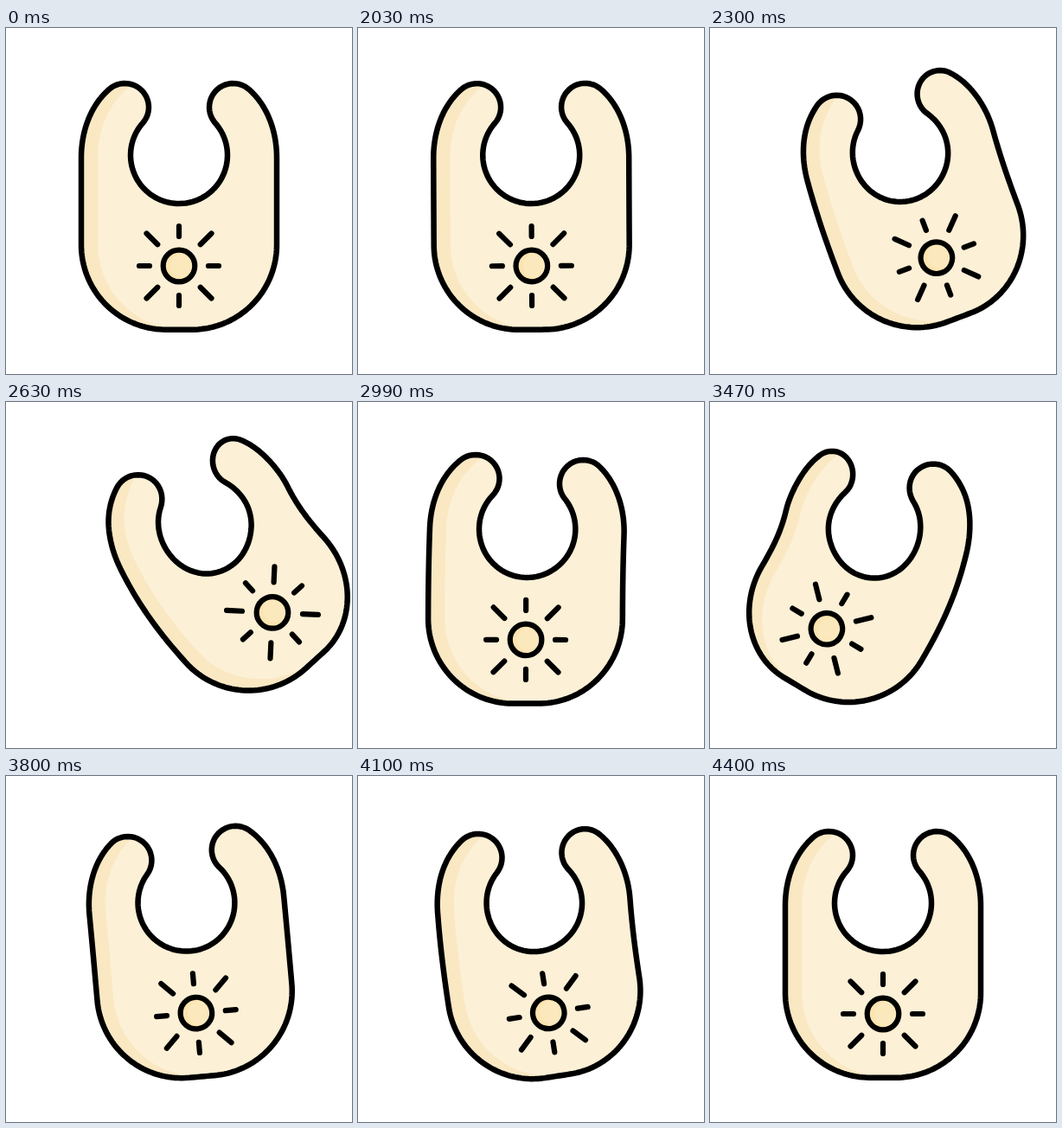
Write an HTML page that moves like this. It is 400 px wide and 400 px high and loops after 4430 ms.

```html
<!DOCTYPE html>
<html>
<head>
<meta charset="utf-8">
<style>
html, body { margin: 0; width: 100%; height: 100%; overflow: hidden; background: #fff; }
svg { display: block; width: 100vw; height: 100vh; }
</style>
</head>
<body>
<svg viewBox="0 0 400 400">
  <path id="fill" fill="#fcf0d6"/>
  <path id="shade" fill="#fae8c3"/>
  <path id="line" fill="none" stroke="#000" stroke-width="6.5" stroke-linejoin="round"/>
  <g id="sun" stroke="#000" stroke-width="6.2" stroke-linecap="round">
    <circle r="18.3" fill="#fce4b0" stroke="none"/>
    <circle cx="4" r="14" fill="#fbe8bc" stroke="none"/>
    <circle r="18.3" fill="none"/>
    <path id="rays" fill="none"/>
  </g>
</svg>
<script>
const LOOP = 4430, START = 2030, STEP = 30;
const MID = 200, TOP = 60, END = 352, SUN_Y = 275;
const BODY = 'M158 110A27.6 27.6 0 0 0 118 72C98 90 87 119 87 150V250A98 98 0 0 0 185 348.7' +
  'H215A98 98 0 0 0 313 250V150C313 119 302 90 282 72A27.6 27.6 0 0 0 242 110A56 56 0 1 1 158 110Z';
const SHADE = 'M146 65Q130 60 118 72C98 90 87 119 87 150V250A98 98 0 0 0 185 348' +
  'H200C148 346 106 303 106 250V150C106 115 120 85 146 65Z';

// turning points of the swing: time, angle of the bottom, angle of the straps
const SWING = [
  [2000, 0, 0],
  [2610, -42.5, -23],
  [3335, 37, 13],
  [3945, -12, -6],
  [4400, 0, 0]
];
const LEAD = 90; // the straps run ahead of the bottom

const $ = id => document.getElementById(id);

function sample(d, n) {
  const p = document.createElementNS('http://www.w3.org/2000/svg', 'path');
  p.setAttribute('d', d);
  const len = p.getTotalLength();
  return Array.from({ length: n }, (_, i) => p.getPointAtLength(len * i / n));
}

function smooth(a, b, v) {
  const t = Math.min(1, Math.max(0, (v - a) / (b - a)));
  return t * t * (3 - 2 * t);
}

// adds up the eased steps from one turning point to the next
function angle(t, col) {
  let a = 0;
  for (let i = 1; i < SWING.length; i++) {
    const p = SWING[i - 1], q = SWING[i];
    a += (q[col] - p[col]) * smooth(p[0], q[0], t);
  }
  return a * Math.PI / 180;
}

// a spine down the middle whose angle turns gradually from straps to bottom
function bendSpine(top, bottom) {
  const spine = [];
  let x = MID, y = TOP;
  for (let v = TOP; v <= END; v++) {
    const a = top + (bottom - top) * smooth(90, 265, v);
    spine.push({ x, y, a });
    x -= Math.sin(a);
    y += Math.cos(a);
  }
  return spine;
}

function warp(spine, bend) {
  return p => {
    const i = Math.min(spine.length - 1, Math.max(0, Math.floor(p.y - TOP)));
    const s = spine[i], rest = p.y - TOP - i, side = Math.sign(p.x - MID);
    const w = (p.x - MID) * (1 + Math.min(0, side * bend * .25)); // inner side is squeezed
    const c = Math.cos(s.a), n = Math.sin(s.a);
    return [s.x + w * c - rest * n, s.y + w * n + rest * c];
  };
}

const outline = sample(BODY, 300), crescent = sample(SHADE, 200);
const trace = (pts, f) =>
  'M' + pts.map(p => f(p).map(v => v.toFixed(2)).join(' ')).join('L') + 'Z';

let rays = '';
for (let i = 0; i < 8; i++) {
  const a = i * Math.PI / 4, [from, to] = i % 2 ? [35, 53] : [34, 46];
  const at = r => (r * Math.cos(a)).toFixed(2) + ' ' + (r * Math.sin(a)).toFixed(2);
  rays += 'M' + at(from) + 'L' + at(to);
}
$('rays').setAttribute('d', rays);

function draw(ms) {
  let t = ms % LOOP;
  t = t < START ? 0 : START + Math.floor((t - START) / STEP) * STEP;
  const bottom = angle(t, 1);
  const top = angle(t + LEAD * smooth(START, SWING[1][0], t), 2);
  const spine = bendSpine(top, bottom), f = warp(spine, bottom - top);
  const d = trace(outline, f), s = spine[SUN_Y - TOP];
  $('fill').setAttribute('d', d);
  $('line').setAttribute('d', d);
  $('shade').setAttribute('d', trace(crescent, f));
  $('sun').setAttribute('transform', `translate(${s.x} ${s.y}) rotate(${s.a * 180 / Math.PI})`);
}

let begin;
function tick(now) {
  if (begin === undefined) begin = now;
  draw(now - begin);
  requestAnimationFrame(tick);
}
draw(0);
requestAnimationFrame(tick);
</script>
</body>
</html>
```
